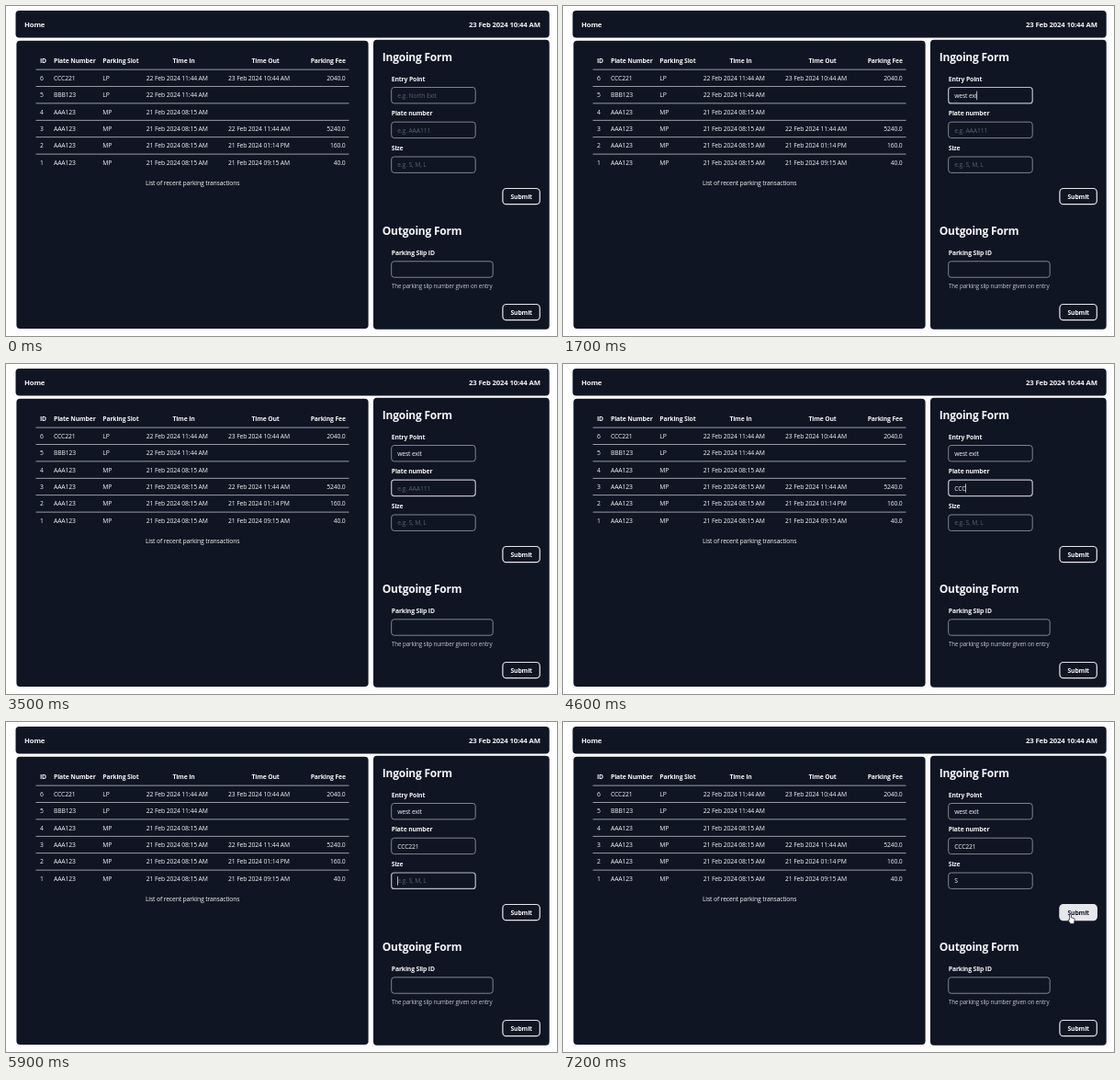
An HTML page that plays this animation: 600 px wide and 359 px high, repeating every 8 s.

```html
<!DOCTYPE html>
<html lang="en">
<head>
<meta charset="utf-8">
<title>Parking</title>
<style>
  html, body { margin: 0; width: 100%; height: 100%; overflow: hidden; background: #fefefe; }
  svg { display: block; }
  text { font: 500 6.8px "Open Sans", "Noto Sans", sans-serif; letter-spacing: -.02em; fill: #f4f5f7; white-space: pre; }
  .strong { font-weight: 700; }
  .bar { font-size: 7.75px; }
  .title { font-size: 12px; }
  .hint { font-size: 6.25px; fill: #c3c7ce; }
  .middle { text-anchor: middle; }
  .end { text-anchor: end; }
  .panel { fill: #0f1523; }
  .field { fill: none; stroke: #8d929c; stroke-width: .9; }
  .field.focus { stroke: #b9bec8; stroke-width: 1.2; }
  .empty { fill: #596070; }
  .button { fill: #e5e7eb; fill-opacity: 0; stroke: #e5e7eb; stroke-width: 1.2; }
  .rule { fill: #b9bdc5; }
  .caret { fill: #f4f5f7; }
  .pointer path { fill: #fff; stroke: #111; stroke-width: .7; stroke-linejoin: round; }
</style>
</head>
<body>
<svg id="stage" width="600" height="359" viewBox="0 0 600 359"></svg>
<script>
const stage = document.getElementById('stage');

function add(tag, attrs, parent = stage) {
  const node = document.createElementNS('http://www.w3.org/2000/svg', tag);
  for (const key in attrs) node.setAttribute(key, attrs[key]);
  return parent.appendChild(node);
}
function box(x, y, width, height, rx, name) {
  return add('rect', { x, y, width, height, rx, class: name });
}
// y is the middle of the capitals
function label(string, x, y, name = '', size = 6.8) {
  const node = add('text', { x, y: y + size * .357, class: name });
  node.textContent = string;
  return node;
}
function button(y) {
  return { frame: box(540.9, y, 40.4, 17.2, 4, 'button'), text: label('Submit', 561.2, y + 9, 'strong middle') };
}
function field(name, y, placeholder, width = 91.5) {
  label(name, 419.8, y - 9.4, 'strong');
  return {
    frame: box(419.7, y, width, 17.4, 3, 'field'),
    text: label(placeholder, 426.2, y + 9, 'empty'),
    placeholder, y
  };
}

box(10.5, 5, 581.2, 29.5, 4, 'panel');
box(11.4, 37.8, 383.2, 313.2, 4, 'panel');
box(400, 36.8, 191.7, 315, 4, 'panel');
label('Home', 20, 20, 'strong bar', 7.75);
label('23 Feb 2024 10:44 AM', 581.8, 20, 'strong bar end', 7.75);

label('ID', 37, 59.3, 'strong');
label('Plate Number', 52, 59.3, 'strong');
label('Parking Slot', 105.3, 59.3, 'strong');
label('Time In', 193.5, 59.3, 'strong middle');
label('Time Out', 282.5, 59.3, 'strong middle');
label('Parking Fee', 369.8, 59.3, 'strong end');
const early = '21 Feb 2024 08:15 AM', late = '22 Feb 2024 11:44 AM';
[
  ['6', 'CCC221', 'LP', late, '23 Feb 2024 10:44 AM', '2040.0'],
  ['5', 'BBB123', 'LP', late, '', ''],
  ['4', 'AAA123', 'MP', early, '', ''],
  ['3', 'AAA123', 'MP', early, late, '5240.0'],
  ['2', 'AAA123', 'MP', early, '21 Feb 2024 01:14 PM', '160.0'],
  ['1', 'AAA123', 'MP', early, '21 Feb 2024 09:15 AM', '40.0']
].forEach((row, i) => {
  const y = 78.3 + i * 18.4;
  box(32.5, y - 9.6, 341, .8, 0, 'rule');
  row.forEach((cell, c) => label(cell, [37, 52, 105.3, 152.8, 242, 369.6][c], y, c === 5 ? 'end' : ''));
});
label('List of recent parking transactions', 203.2, 192.2, 'middle');

label('Ingoing Form', 409.8, 55.6, 'strong title', 12);
const fields = [
  field('Entry Point', 88.5, 'e.g. North Exit'),
  field('Plate number', 126.2, 'e.g. AAA111'),
  field('Size', 164, 'e.g. S, M, L')
];
const submit = button(198.5);
label('Outgoing Form', 409.8, 244.8, 'strong title', 12);
field('Parking Slip ID', 277.8, '', 110.5);
label('The parking slip number given on entry', 420, 304.8, 'hint', 6.25);
button(324.5);

const caret = box(0, 0, .7, 9.6, 0, 'caret');
const arrow = add('g', { class: 'pointer' });
add('path', { d: 'M0 0V8.6L2 6.8L3.3 9.8L4.9 9.1L3.6 6.2H6.3Z' }, arrow);
const hand = add('g', { class: 'pointer' });
add('path', { d: 'M1.6 5.8V1Q2.5 -.3 3.4 1V4L6.2 4.6Q7.4 5 7.2 6.4L6.5 10.6H2.6L.2 7.4Q-.4 5.8 1.6 6.6Z' }, hand);

// [start, text] per field
const typing = [
  [[600, 'w'], [700, 'we'], [800, 'wes'], [1000, 'west'], [1200, 'west '], [1400, 'west e'],
   [1600, 'west ex'], [1700, 'west exi'], [2000, 'west exit']],
  [[4100, 'C'], [4400, 'CC'], [4600, 'CCC'], [5100, 'CCC2'], [5300, 'CCC221']],
  [[6100, 'S']]
];
const focusTimes = [[300, 2900], [2900, 5900], [5900, 6400]];
const caretOff = [[2500, 2900], [3500, 4000]];
// [start, x, y]
const pointerPath = [[6300, 470, 170], [6400, 505, 172], [6500, 535, 177], [6600, 551, 184],
  [6900, 552.6, 197], [7000, 552.6, 202], [7100, 551, 206], [7200, 550, 208.8]];

const within = (t, [from, to]) => t >= from && t < to;
const latest = (steps, t) => steps.filter(step => step[0] <= t).pop();

function draw(t) {
  caret.setAttribute('visibility', 'hidden');
  fields.forEach((f, i) => {
    const typed = (latest(typing[i], t) || [0, ''])[1];
    const focused = within(t, focusTimes[i]);
    f.text.textContent = typed || f.placeholder;
    f.text.classList.toggle('empty', !typed);
    f.frame.classList.toggle('focus', focused);
    if (focused && !caretOff.some(span => within(t, span))) {
      caret.setAttribute('x', 426 + (typed ? f.text.getComputedTextLength() : 0));
      caret.setAttribute('y', f.y + 4);
      caret.setAttribute('visibility', 'visible');
    }
  });

  const spot = latest(pointerPath, t);
  const hover = Math.min(1, Math.max(0, (t - 6900) / 300));
  const overButton = t >= 7000;
  submit.frame.style.fillOpacity = hover;
  submit.text.style.fill = hover > .5 ? '#141a26' : '';
  arrow.setAttribute('visibility', spot && !overButton ? 'visible' : 'hidden');
  hand.setAttribute('visibility', overButton ? 'visible' : 'hidden');
  if (spot) for (const g of [arrow, hand]) g.setAttribute('transform', `translate(${spot[1]} ${spot[2]})`);
}

function tick() {
  draw(Math.floor(performance.now() % 8000 / 100) * 100);
  requestAnimationFrame(tick);
}
tick();
</script>
</body>
</html>
```
